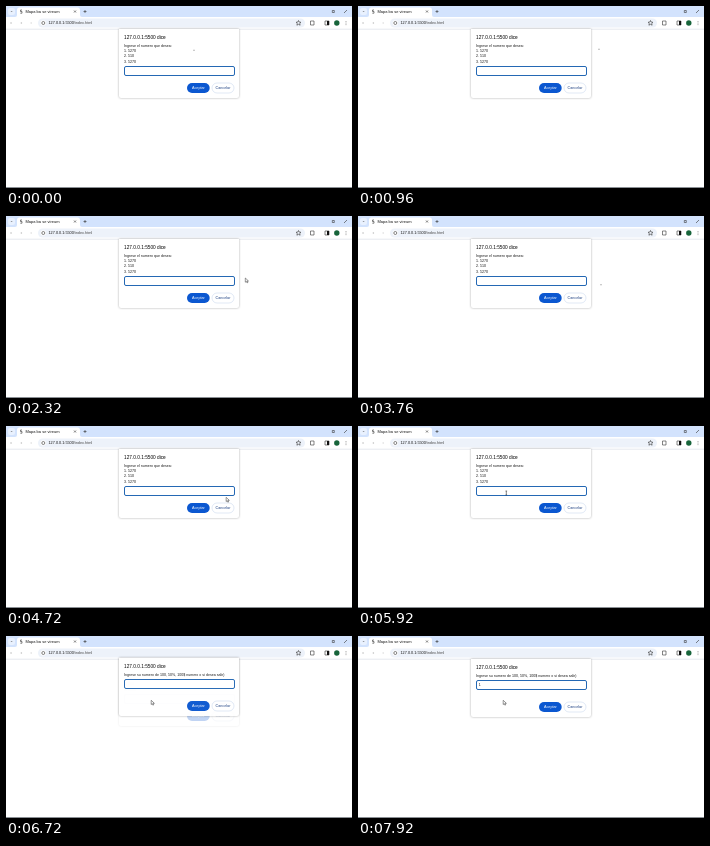
Animation of 346 by 182 pixels, one loop 8000 ms. Source, as an HTML page:

```html
<!DOCTYPE html>
<html lang="es">
<head>
<meta charset="utf-8">
<title>Prompt</title>
<style>
  html, body { margin: 0; width: 100%; height: 100%; overflow: hidden; background: #fff; }
  svg { display: block; width: 100vw; height: 100vh; font: 3.6px "Liberation Sans", Arial, sans-serif; fill: #111; }
  .line { fill: none; stroke: #333; stroke-width: .6; }
  .dim { stroke: #bbb; }
  .panel { fill: #fff; filter: drop-shadow(0 .6px .8px #0005); }
  .title { font-size: 4.75px; fill: #000; }
  .field { fill: #fff; stroke: #2468b4; stroke-width: 1; }
  .accept { fill: #0b57d0; }
  .cancel { fill: #fff; stroke: #c3d3ea; stroke-width: .5; }
  .button { text-anchor: middle; font-size: 3.7px; }
</style>
</head>
<body>
<svg viewBox="0 0 346 182" preserveAspectRatio="none">
  <rect width="346" height="182" fill="#fff"/>

  <!-- tab strip -->
  <rect width="346" height="11" fill="#d3e3fd"/>
  <rect x="2" y="2" width="7" height="7" rx="2" fill="#e9f1fe"/>
  <path class="line" d="M5 5.200l.6.6.6-.6"/>
  <path d="M9 11q2 0 2-2V4q0-2.500 2.500-2.500H71.500q2.500 0 2.500 2.500V9q0 2 2 2z" fill="#fff"/>
  <path class="line" d="M16 4h-1.500v1.500h1.500v1.700h-1.700"/>
  <text x="19.500" y="7.200" font-size="4">Mapa ba se vireum</text>
  <path class="line" d="M68 4.500l2 2m0-2l-2 2M77.500 5.500h3m-1.500-1.500v3"/>
  <path class="line" d="M326.300 4.500h2v2h-2zM338 7l3-3"/>

  <!-- toolbar -->
  <path class="line dim" d="M6 17H4.500m.7-.8l-.7.8.7.8M14.500 17H16m-.7-.8l.7.800-.7.800M24.500 17h1.500"/>
  <rect x="32" y="12.500" width="267" height="9" rx="4.500" fill="#edf2fa"/>
  <circle cx="37.300" cy="17" r="2.700" fill="#fff"/>
  <circle cx="37.300" cy="17" r="1.500" class="line"/>
  <text x="42.500" y="18.400" font-size="3.800">127.0.0.1:5500<tspan fill="#444">/index.html</tspan></text>
  <path class="line" d="M292.500 14.500l.7 1.600 1.800.2-1.300 1.200.4 1.700-1.600-.9-1.600.9.4-1.700-1.300-1.200 1.800-.2z"/>
  <path class="line" d="M304.500 15h3.500v4h-3.500zM319 15h4v4h-4z"/>
  <path d="M321 15h2v4h-2z"/>
  <circle cx="330.800" cy="17" r="2.700" fill="#17643a"/>
  <path class="line" d="M340 15v.7m0 1v.7m0 1v.7"/>
  <path d="M0 23.200H346" stroke="#d5dbe3" stroke-width=".6"/>
  <path d="M0 181.500H346" stroke="#8a8f94"/>

  <g id="first"></g>
  <g id="second"></g>
  <g id="cursor">
    <path id="dot" d="M0 .3h1v.9H0z" fill="#777"/>
    <path id="arrow" d="M0 0v4.200l1-.9.700 1.600.8-.4-.7-1.500h1.400z" fill="#fff" stroke="#333" stroke-width=".5"/>
    <path id="beam" class="line" d="M-.8 0H.8M0 0v4M-.8 4H.8"/>
  </g>
</svg>
<script>
const LOOP = 8000, STEP = 80, SWITCH = 6720, TYPED = 7680;
const $ = id => document.getElementById(id);

function dialog(lines, fieldY, buttonY, extra = '') {
  const message = lines.map((text, i) =>
    `<text x="118" y="${(40.5 + i * 5.4).toFixed(1)}">${text}</text>`).join('');
  return `<path class="panel" d="M113 23H233V${buttonY + 13}q0 2-2 2H115q-2 0-2-2z"/>
    <text class="title" x="118" y="32.700">127.0.0.1:5500 dice</text>${message}
    <rect class="field" x="118.500" y="${fieldY}" width="110" height="9" rx="1.500"/>
    <rect class="accept" x="181" y="${buttonY}" width="22.700" height="10" rx="5"/>
    <rect class="cancel" x="206" y="${buttonY}" width="22" height="10" rx="5"/>
    <text class="button" x="192.400" y="${buttonY + 6.3}" fill="#fff">Aceptar</text>
    <text class="button" x="217" y="${buttonY + 6.3}" fill="#1b3f80">Cancelar</text>${extra}`;
}

$('first').innerHTML = dialog(
  ['Ingrese el numero que desea:', '1. 5270', '2. 510', '3. 5270'], 60.5, 77);
$('second').innerHTML = dialog(
  ['Ingrese su numero de 100, 50%, 100$ numero o si desea salir)'], 44.5, 66,
  '<text id="typed" x="120.800" y="50.300">1</text>');

// Pointer stops: time, x, y
const path = [
  [0, 187.5, 43.5], [400, 205, 78], [880, 240.5, 42.5], [1760, 240, 45],
  [2320, 239.3, 62], [2640, 239.3, 63], [3520, 242.5, 65], [3760, 242.5, 68],
  [4400, 242.5, 68], [5200, 179, 77.5], [5920, 148.3, 65], [6400, 145.2, 64.3],
  [LOOP, 145.2, 64.3]
];
const shapes = [[0, 'dot'], [2000, 'arrow'], [3200, 'dot'], [4640, 'arrow'],
  [5600, 'beam'], [6480, 'arrow']];

function pointerAt(t) {
  const i = path.findIndex(stop => stop[0] > t);
  const [t0, x0, y0] = path[i - 1], [t1, x1, y1] = path[i];
  const u = (t - t0) / (t1 - t0), ease = u * u * (3 - 2 * u);
  return [x0 + (x1 - x0) * ease, y0 + (y1 - y0) * ease];
}

const show = (id, visible) => $(id).style.display = visible ? '' : 'none';

// Moves a dialog vertically and sets its opacity.
function pose(id, dy, opacity) {
  $(id).setAttribute('transform', `translate(0 ${dy})`);
  $(id).setAttribute('opacity', opacity);
}

function draw(now) {
  const t = Math.floor(now % LOOP / STEP) * STEP;
  const swapping = t === SWITCH;
  show('first', t <= SWITCH);
  show('second', t >= SWITCH);
  pose('first', swapping ? -2 : 0, swapping ? .25 : 1);
  pose('second', swapping ? -1 : 0, swapping ? .97 : 1);
  show('typed', t >= TYPED);

  const shape = shapes.filter(([start]) => start <= t).pop()[1];
  for (const id of ['dot', 'arrow', 'beam']) show(id, id === shape);
  $('cursor').setAttribute('transform', `translate(${pointerAt(t)})`);
}

const start = performance.now();
function frame() {
  draw(performance.now() - start);
  requestAnimationFrame(frame);
}
frame();
</script>
</body>
</html>
```
